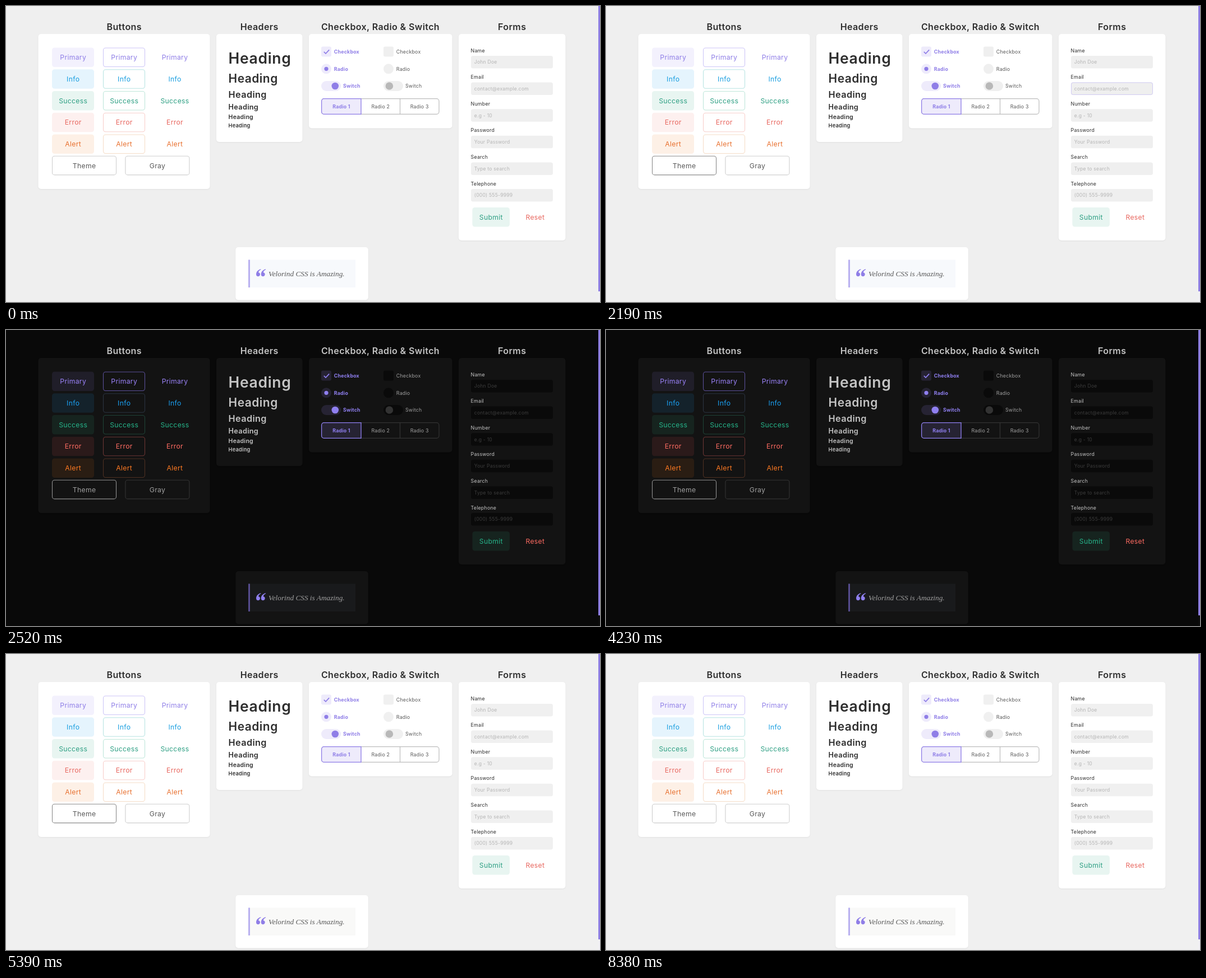
Animation, 1059 px wide and 529 px high, one loop 8870 ms. Source, as an HTML page:

```html
<!DOCTYPE html>
<html lang="en">
<head>
<meta charset="utf-8">
<title>UI kit themes</title>
<style>
  html, body { margin: 0; width: 100%; height: 100%; overflow: hidden; background: #efefef; }
  svg { display: block; width: 1059px; height: 529px; }
  text { font-family: Inter, sans-serif; letter-spacing: .025em; white-space: pre; }
  .mid { text-anchor: middle; }
  .title { font-size: 16px; font-weight: 600; fill: var(--head); }
  .head { font-weight: 600; fill: var(--head); }
  .btn { font-size: 12.2px; }
  .small { font-size: 8.8px; }
  .bold { font-weight: 700; }
  .hint { font-size: 8.6px; fill: var(--hint); }
  .quote { font: italic 13.3px "Liberation Serif", serif; letter-spacing: 0; fill: var(--quote); }
  .card { fill: var(--card); filter: drop-shadow(0 1px 1px rgba(0, 0, 0, .06)); }
</style>
</head>
<body>
<svg id="stage" viewBox="0 0 1059 529"></svg>
<script>
const LOOP = 8870;
const stage = document.getElementById('stage');

function add(tag, attrs, content) {
  const el = document.createElementNS('http://www.w3.org/2000/svg', tag);
  for (const k in attrs) el.setAttribute(k, attrs[k]);
  if (content) el.textContent = content;
  stage.appendChild(el);
  return el;
}
const v = name => `var(--${name})`;
const box = (x, y, width, height, rx, fill, more) =>
  add('rect', { x, y, width, height, rx, fill, ...more });
const outline = (x, y, w, h, r, stroke, more) =>
  box(x + .5, y + .5, w - 1, h - 1, r, 'none', { stroke, ...more });
const dot = (cx, cy, r, fill) => add('circle', { cx, cy, r, fill });
const text = (x, y, str, cls, fill, more) =>
  add('text', { x, y, class: cls, ...(fill && { fill }), ...more }, str);
const path = (d, attrs) => add('path', { d, fill: 'none', ...attrs });

// Colours
const KINDS = ['primary', 'info', 'success', 'error', 'alert'];
const BASE = ['page', 'card', 'head', 'field', 'hint', 'tab', 'qbg', 'quote', 'bar', 'rail', 'checked', 'accent'];
const NAMES = [...BASE, ...KINDS.flatMap(k => [k + '-bg', k + '-fg', k + '-bd'])];

function palette(base, kinds) {
  const list = (base + ' ' + kinds).split(' ');
  return Object.fromEntries(NAMES.map((n, i) => [n, '#' + list[i]]));
}
const BRIGHT = 'f3f1fd 8f7ee7 cdc6f7 e5f4fd 1a9fe0 b8e4e2 e8f5f1 2fa084 bfe6da ' +
  'fdf0ef e8675f f8cfcb fdf0e6 e8702f f5ddc8';
const DEEP = '201e29 9a82f8 5a4f98 14222b 1a9ff0 2a3340 16241f 26b48a 1f4236 ' +
  '2b1a1a ff6b62 6a3533 2a1d13 ff7a22 4d3022';
const PLAIN = 'f2f2f2 8a8a8a cccccc ' + Array(4).fill('f2f2f2 8a8a8a dddddd').join(' ');

const themes = {
  day: palette('efefef ffffff 2e2e2e efefef b5b5b5 595959 f7f9fc 595959 b9b0f0 f1f0f5 eeebfb 8f7ee7', BRIGHT),
  night: palette('090909 131313 c4c4c4 0a0a0a 3c3c3c a0a0a0 191a1c a0a0a0 564c8e 0c0c0c 262333 8f7ff0', DEEP),
  light: palette('f0f0f0 ffffff 2e2e2e f0f0f0 b5b5b5 595959 f9f9f8 595959 b9b0f0 f1f0f5 eeebfb 8f7ee7', BRIGHT),
  mono: palette('f0f0f0 ffffff 2e2e2e f0f0f0 b5b5b5 595959 f9f9f8 595959 b8b8b8 f1f0f5 f0f0f0 858585', PLAIN)
};
const switches = [[0, 'day'], [2240, 'night'], [4360, 'light'], [6170, 'mono'], [7740, 'light']];

// Grey levels that ease: [start, end, from, to]
const greys = {
  off: [[2240, 2520, 239, 10, 233], [4360, 4600, 17, 240]],
  knob: [[2240, 2520, 184, 51], [4360, 4600, 58, 184]],
  edge: [[2240, 2520, 189, 51, 212], [4360, 4600, 34, 189]],
  label: [[2240, 2520, 89, 160, 102], [4360, 4600, 138, 89]],
  themeEdge: [[1490, 1790, 207, 138], [2240, 2520, 90, 143], [4360, 4600, 184, 138], [5390, 5480, 138, 204]],
  grayEdge: [[2240, 2520, 207, 51, 216], [4360, 4600, 112, 207], [5390, 5480, 207, 168], [8260, 8380, 168, 207]]
};
const focusFade = [[160, 280, 0, 1], [2080, 2190, 1, .8], [2240, 2240, .8, 0]];
const caretOn = [[20, 530], [1050, 1570]];

// A fifth entry replaces "from" once the step has begun.
function level(steps, t) {
  let value = steps[0][2];
  for (const [start, end, from, to, jump = from] of steps) {
    if (t < start) break;
    const k = t >= end ? 1 : (t - start) / (end - start);
    value = jump + (to - jump) * (1 - (1 - k) ** 2);
  }
  return value;
}

// Layout
box(0, 0, 1059, 529, 0, v('page'));
box(1056, 0, 3, 529, 0, v('rail'));
box(1056, 0, 3, 510, 0, '#8f7fe4');

[['Buttons', 210.7], ['Headers', 451.7], ['Checkbox, Radio & Switch', 667.5], ['Forms', 902.2]]
  .forEach(([s, x]) => text(x, 43.2, s, 'title mid'));
[[57.5, 50, 306, 277], [375, 50, 153.5, 193], [540, 50, 255.5, 168.5],
 [807, 50, 190.5, 369], [409.3, 431, 236.5, 94.5]]
  .forEach(([x, y, w, h]) => box(x, y, w, h, 5, null, { class: 'card' }));

KINDS.forEach((kind, i) => {
  const y = 74.5 + i * 38.75;
  const label = kind[0].toUpperCase() + kind.slice(1);
  box(82, y, 75, 34.5, 4.5, v(kind + '-bg'));
  outline(173, y, 75, 34.5, 4, v(kind + '-bd'), { 'stroke-width': 1.1 });
  [119.7, 210.7, 301].forEach(x => text(x, y + 21.6, label, 'btn mid', v(kind + '-fg')));
});
[[82, 'Theme', 'themeEdge'], [212.4, 'Gray', 'grayEdge']].forEach(([x, s, edge]) => {
  outline(x, 267.8, 115, 34.6, 4, v(edge), { 'stroke-width': 1.1 });
  text(x + 57.6, 290, s, 'btn mid', v('label'));
});

[[26.5, 103], [20.9, 137.2], [16.2, 164.2], [12.7, 185.4], [10.5, 202.2], [9.26, 216.8]]
  .forEach(([size, y]) => text(396.6, y, 'Heading', 'head', null, { 'font-size': size }));

// Toggles: left column is on, right column is off
[[562, true], [673, false]].forEach(([x, on]) => {
  const bg = v(on ? 'checked' : 'off');
  const cls = on ? 'small bold' : 'small';
  const fg = v(on ? 'accent' : 'label');
  box(x, 72.5, 18, 18, 3, bg);
  dot(x + 9, 112.3, 9, bg);
  box(x, 134, 35, 18, 9, bg);
  if (on) {
    path('M566.8 81.8l3.2 3.2 6.2-6.6', { stroke: fg, 'stroke-width': 1.7 });
    dot(571, 112.3, 3.6, fg);
    dot(586.8, 143, 6.3, fg);
  } else {
    dot(683.4, 143, 6.8, v('knob'));
  }
  text(x + 22.8, 84.8, 'Checkbox', cls, fg);
  text(x + 22.8, 115.5, 'Radio', cls, fg);
  text(x + 39, 146.3, 'Switch', cls, fg);
});

const edge = { stroke: v('edge'), 'stroke-width': 1.2 };
outline(562.2, 165.2, 210.3, 28.6, 4.5, v('edge'), { 'stroke-width': 1.2 });
path('M702.5 165.7v27.6', edge);
path('M567 165.7h66v27.6h-66a4.4 4.4 0 0 1-4.4-4.4v-18.8a4.4 4.4 0 0 1 4.4-4.4z',
  { fill: v('checked'), stroke: v('accent'), 'stroke-width': 1.3 });
text(598, 182.7, 'Radio 1', 'small bold mid', v('accent'));
text(667.8, 182.7, 'Radio 2', 'small mid', v('tab'));
text(737.2, 182.7, 'Radio 3', 'small mid', v('tab'));

[['Name', 'John Doe'], ['Email', 'contact@example.com'], ['Number', 'e.g - 10'],
 ['Password', 'Your Password'], ['Search', 'Type to search'], ['Telephone', '(000) 555-9999']]
  .forEach(([label, hint], i) => {
    const y = 89 + i * 47.6;
    text(828.6, y - 6.4, label, 'small', v('head'));
    box(829, y, 146, 22.5, 3.5, v('field'));
    text(834.8, y + 14.4, hint, 'hint');
  });
const focus = outline(829, 136.4, 146, 22.5, 3.2, '#c9c2f4');
const caret = box(834, 142, 1, 11, 0, '#333');

box(831.4, 360, 66.6, 34.5, 4.5, v('success-bg'));
text(864.8, 381.7, 'Submit', 'btn mid', v('success-fg'));
text(943.4, 381.7, 'Reset', 'btn mid', v('error-fg'));

box(432, 453.5, 191, 49.5, 0, v('qbg'));
box(432, 453.5, 3, 49.5, 0, v('bar'));
[0, 8.7].forEach(dx => path(
  'M454 470.3C449 471.5 446 475.5 446 479.5C446 482 447.5 483.3 449.3 483.3' +
  'C451.4 483.3 453 481.7 453 479.5C453 477.5 451.8 476.3 450 476.2C450.5 474 452 472.2 454.6 471.3Z',
  { fill: v('accent'), transform: `translate(${dx} 0)` }));
text(468, 483, 'Velorind CSS is Amazing.', 'quote');

// Playback
const setVar = (name, value) => stage.style.setProperty('--' + name, value);
let current;

function draw(t) {
  const name = switches.filter(([at]) => t >= at).pop()[1];
  if (name !== current) {
    current = name;
    for (const key of NAMES) setVar(key, themes[name][key]);
  }
  for (const key in greys) {
    const g = Math.round(level(greys[key], t));
    setVar(key, `rgb(${g}, ${g}, ${g})`);
  }
  focus.setAttribute('opacity', level(focusFade, t));
  caret.setAttribute('opacity', caretOn.some(([a, b]) => t >= a && t < b) ? 1 : 0);
}

const began = performance.now();
function tick() {
  draw((performance.now() - began) % LOOP);
  requestAnimationFrame(tick);
}
tick();
</script>
</body>
</html>
```
